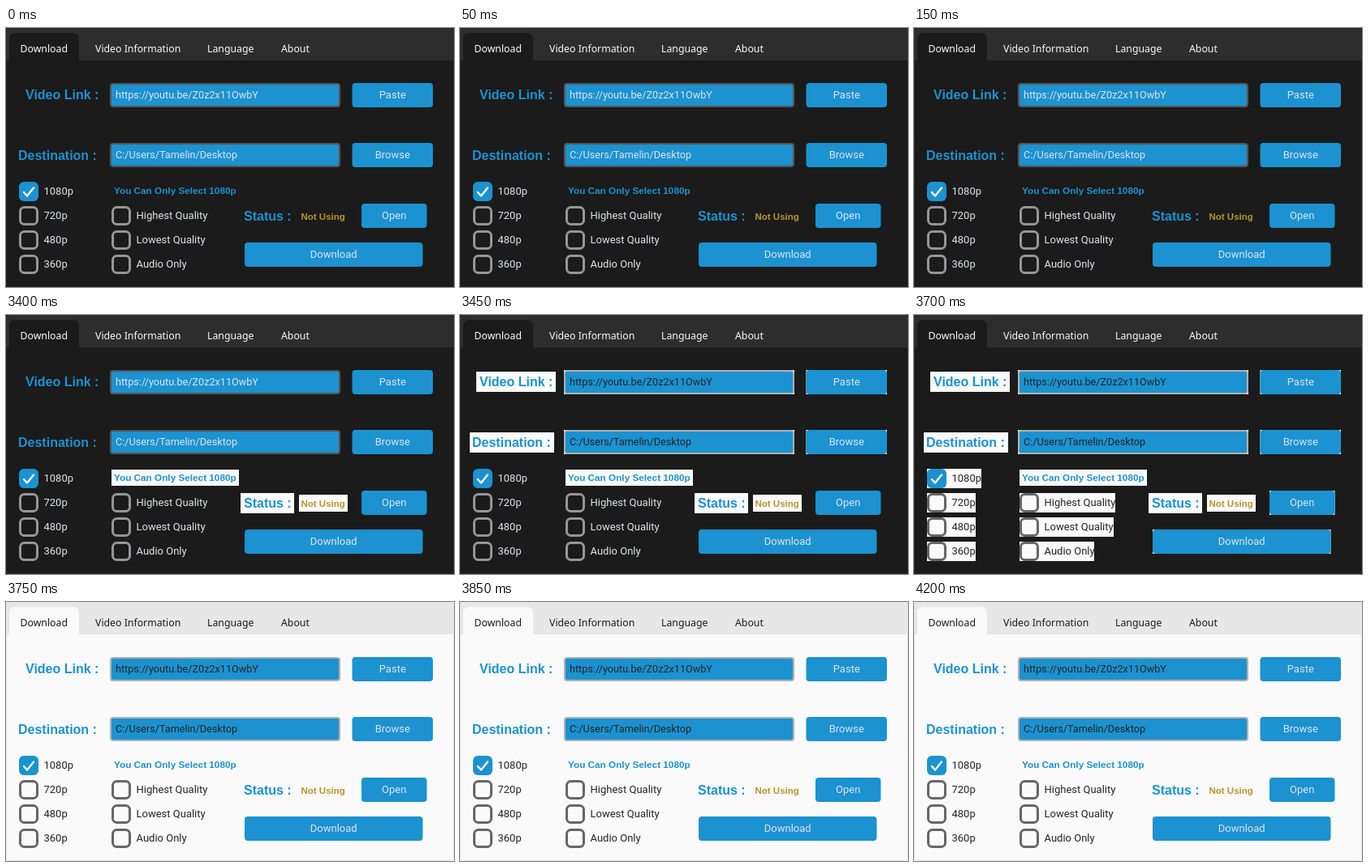
Recreate the animation shown at these times as an HTML page. Size 552 by 320 pixels, loop 6.3 s.

```html
<!DOCTYPE html>
<html lang="en">
<head>
<meta charset="utf-8">
<title>Downloader theme switch</title>
<style>
  html, body { margin: 0; width: 100%; height: 100%; overflow: hidden; background: #1b1b1b; }
  svg { display: block; width: 552px; height: 320px; }
  text { white-space: pre; }
  .tab { font: 12.3px "Noto Sans", "Open Sans", sans-serif; }
  .ui { font: 13px Roboto, sans-serif; }
  .entry { font: 12.65px Roboto, sans-serif; }
  .title { font: bold 16px "Liberation Sans", Arial, sans-serif; }
  .note { font: bold 11.75px "Liberation Sans", Arial, sans-serif; }
  .state { font: bold 11.5px "Liberation Sans", Arial, sans-serif; }

  /* Each part of the light theme appears at its own moment and stays until the loop restarts. */
  #light g { visibility: hidden; animation: 6300ms step-end infinite; }
  #light .status  { animation-name: at3400; }
  #light .inputs  { animation-name: at3450; }
  #light .actions { animation-name: at3500; }
  #light .high    { animation-name: at3550; }
  #light .low     { animation-name: at3600; }
  #light .extra   { animation-name: at3650; }
  #light .page    { animation-name: at3750; }
  @keyframes at3400 { 0% { visibility: hidden } 53.95%, 100% { visibility: visible } }
  @keyframes at3450 { 0% { visibility: hidden } 54.75%, 100% { visibility: visible } }
  @keyframes at3500 { 0% { visibility: hidden } 55.54%, 100% { visibility: visible } }
  @keyframes at3550 { 0% { visibility: hidden } 56.33%, 100% { visibility: visible } }
  @keyframes at3600 { 0% { visibility: hidden } 57.13%, 100% { visibility: visible } }
  @keyframes at3650 { 0% { visibility: hidden } 57.92%, 100% { visibility: visible } }
  @keyframes at3750 { 0% { visibility: hidden } 59.51%, 100% { visibility: visible } }
</style>
</head>
<body>
<svg viewBox="0 0 552 320">
  <g id="dark"></g>
  <g id="light"></g>
</svg>
<script>
const BLUE = '#1c92d0', GOLD = '#b7952c';
const themes = {
  dark:  { bg: '#1b1b1b', bar: '#2d2d2d', line: '#262626', tab: '#fafafa', ink: '#dfe3e8', edge: '#565656', box: '#969696' },
  light: { bg: '#fafafa', bar: '#e7e7e7', line: '#e5e5e5', tab: '#1c1c1c', ink: '#252525', edge: '#b0b0b0', box: '#666666' }
};

const rect = (x, y, w, h, fill, r = 0, extra = '') =>
  `<rect x="${x}" y="${y}" width="${w}" height="${h}" rx="${r}" fill="${fill}" ${extra}/>`;
const text = (x, y, str, style, fill, anchor = 'start') =>
  `<text x="${x}" y="${y}" class="${style}" fill="${fill}" text-anchor="${anchor}">${str}</text>`;
const group = (name, ...parts) => `<g class="${name}">${parts.join('')}</g>`;

function drawTheme(c) {
  const label = (x, y, w, h, textX, baseline, str, style, fill = BLUE) =>
    rect(x, y, w, h, c.bg) + text(textX, baseline, str, style, fill);

  const button = (x, y, w, str) =>
    rect(x, y, w, 30, c.bg) + rect(x, y, w, 30, BLUE, 4) +
    text(x + w / 2, y + 19, str, 'ui', '#dce4ee', 'middle');

  const entry = (y, str) =>
    rect(128, y, 284, 30, c.bg) +
    rect(129, y + 1, 282, 28, BLUE, 3, `stroke="${c.edge}" stroke-width="2"`) +
    text(135, y + 19, str, 'entry', c.ink);

  const checkbox = (x, y, w, str, checked) =>
    rect(x, y, w, 24, c.bg) +
    (checked
      ? rect(x, y, 24, 24, BLUE, 6) +
        `<path d="M${x + 6} ${y + 13}l4 4.5 8-10" fill="none" stroke="#f0f4f8" stroke-width="2.5" stroke-linecap="round" stroke-linejoin="round"/>`
      : rect(x + 1.5, y + 1.5, 21, 21, c.bg, 5, `stroke="${c.box}" stroke-width="3"`)) +
    text(x + 30.5, y + 16, str, 'ui', c.ink);

  const tabs = [[17.5, 'Download'], [110, 'Video Information'], [248, 'Language'], [339, 'About']];

  return [
    group('page',
      rect(0, 0, 552, 320, c.bar),
      rect(0, 40, 552, 280, c.bg),
      `<path d="M.5 40V315.5q0 4 4 4H547.5q4 0 4-4V40" fill="none" stroke="${c.line}"/>`,
      `<path d="M4 41V14q0-8 8-8H82q8 0 8 8V41z" fill="${c.bg}"/>`,
      ...tabs.map(([x, str]) => text(x, 30, str, 'tab', c.tab))),
    group('status',
      label(130, 191, 157, 20, 133, 205, 'You Can Only Select 1080p', 'note'),
      label(289, 220, 66, 25, 293, 238, 'Status :', 'title'),
      label(361, 222, 60, 21, 363.5, 237, 'Not Using', 'state', GOLD)),
    group('inputs',
      label(20, 70, 98, 25, 24, 88, 'Video Link :', 'title'),
      label(12, 145, 104, 25, 15, 163, 'Destination :', 'title'),
      entry(68, 'https://youtu.be/Z0z2x11OwbY'),
      entry(142, 'C:/Users/Tamelin/Desktop'),
      button(426.5, 68, 99.5, 'Paste'),
      button(426.5, 142, 99.5, 'Browse')),
    group('actions',
      button(438, 217, 80.5, 'Open'),
      button(294, 265, 219.5, 'Download')),
    group('high', checkbox(16, 190, 67, '1080p', true), checkbox(16, 220, 60, '720p')),
    group('low', checkbox(16, 250, 60, '480p'), checkbox(16, 280, 60, '360p')),
    group('extra',
      checkbox(130, 220, 118, 'Highest Quality'),
      checkbox(130, 250, 116, 'Lowest Quality'),
      checkbox(130, 280, 92, 'Audio Only'))
  ].join('');
}

for (const name in themes)
  document.getElementById(name).innerHTML = drawTheme(themes[name]);
</script>
</body>
</html>
```
